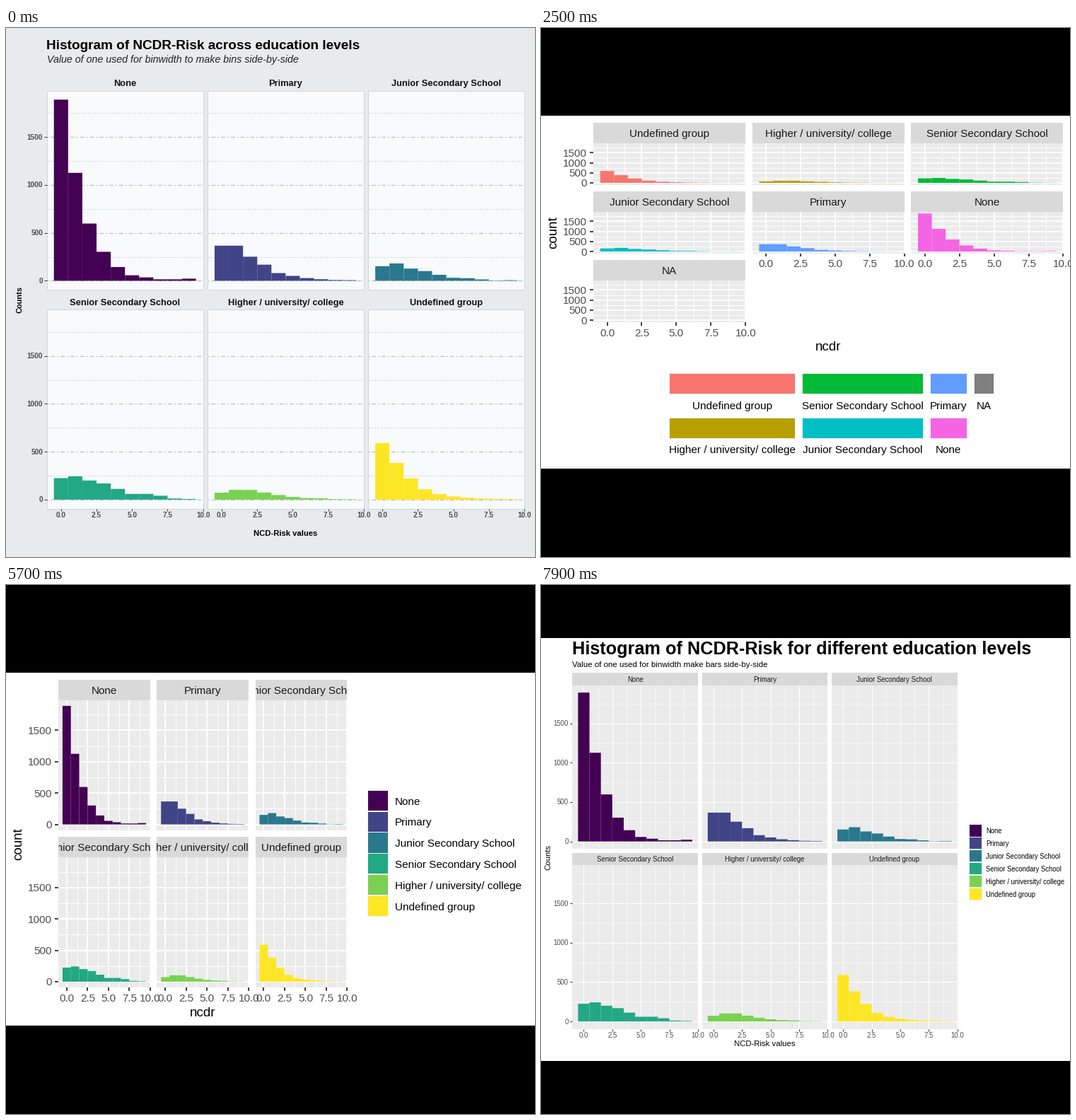
Write a matplotlib script that moves like this. It is 748x748 px and loops after 8000 ms.

```python
import matplotlib.pyplot as plt
import numpy as np
from matplotlib.animation import FuncAnimation
from matplotlib.collections import LineCollection, PolyCollection
from matplotlib.patches import Rectangle

SIZE, DPI = 748, 100
PT = 72 / DPI  # points per pixel
FONT = "Liberation Sans"

COUNTS = {
    "None": [1890, 1126, 597, 302, 143, 57, 35, 15, 15, 22],
    "Primary": [366, 366, 251, 168, 80, 51, 28, 16, 8, 6],
    "Junior Secondary School": [152, 181, 127, 101, 62, 31, 27, 14, 3, 6],
    "Senior Secondary School": [225, 243, 200, 169, 112, 60, 60, 41, 12, 7],
    "Higher / university/ college": [73, 102, 102, 74, 48, 29, 17, 13, 5, 4],
    "Undefined group": [590, 383, 221, 108, 58, 33, 20, 12, 8, 6],
    "NA": [],
}
LEVELS = list(COUNTS)[:6]
REVERSED = LEVELS[::-1] + ["NA"]
VIRIDIS = dict(zip(LEVELS, ["#440154", "#414487", "#2A788E",
                            "#22A884", "#7AD151", "#FDE725"]))
HUE = dict(zip(REVERSED, ["#F8766D", "#B79F00", "#00BA38", "#00BFC4",
                          "#619CFF", "#F564E3", "#7F7F7F"]))
TEAL = dict.fromkeys(REVERSED, "#00BFC4")
GREY = dict.fromkeys(REVERSED, "#595959")
KEY_W = dict(zip(LEVELS, [50.5, 50.5, 170, 170, 177, 177]), NA=27.5)

X_RANGE, Y_RANGE = (-1, 10), (-94.5, 1984.5)
X_TICKS, Y_TICKS = np.arange(0, 10.1, 2.5), np.arange(0, 1501, 500)
WIDE, TALL, FULL = (0, 124, 748, 623), (136, 0, 612, 748), (0, 0, 748, 748)
SCREEN = (0, 75, 748, 673)
TITLE = "Histogram of NCDR-Risk for different education levels"
SUBTITLE = "Value of one used for binwidth make bars side-by-side"


def rect(ax, x0, y0, x1, y1, color, edge="none", lw=0):
    patch = Rectangle((x0, y0), x1 - x0, y1 - y0, fc=color, ec=edge, lw=lw * PT)
    return ax.add_patch(patch)


def text(ax, x, y, s, size, color="black", ha="center", **kw):
    """Place text with its capitals centred on y."""
    return ax.text(x, y + 0.36 * size, s, size=size * PT, color=color, ha=ha,
                   va="baseline", family=FONT, **kw)


def side_text(ax, x, y, s, size, **kw):
    ax.text(x, y, s, size=size * PT, rotation=90, ha="center", va="center",
            family=FONT, **kw)


def lines(ax, segs, color, width, style="solid"):
    ax.add_collection(LineCollection(segs, colors=color, linewidths=width * PT,
                                     linestyles=style, zorder=1), autolim=False)


def scales(x0, y0, x1, y1):
    def sx(v):
        return x0 + (v - X_RANGE[0]) / (X_RANGE[1] - X_RANGE[0]) * (x1 - x0)

    def sy(v):
        return y1 - (v - Y_RANGE[0]) / (Y_RANGE[1] - Y_RANGE[0]) * (y1 - y0)
    return sx, sy


def bars(ax, counts, sx, sy, color):
    quads = [[(sx(i - .5), sy(0)), (sx(i - .5), sy(c)),
              (sx(i + .5), sy(c)), (sx(i + .5), sy(0))]
             for i, c in enumerate(counts)]
    if quads:
        ax.add_collection(PolyCollection(quads, facecolors=color, edgecolors="none",
                                         snap=False, zorder=1), autolim=False)


def facets(ax, names, fill, right, bottom, left=74, top=134, base=18.8,
           small=15.2, xlab="ncdr", ylab="count"):
    ncol, nrow = 3, -(-len(names) // 3)
    gap, strip, lw = base / 2, 1.516 * base, 0.097 * base
    w = (right - left - gap * (ncol - 1)) / ncol
    h = (bottom - top - gap * (nrow - 1)) / nrow - strip
    for i, name in enumerate(names):
        row, col = divmod(i, ncol)
        x0, ys = left + col * (w + gap), top + row * (h + strip + gap)
        x1, y0, y1 = x0 + w, ys + strip, ys + strip + h
        sx, sy = scales(x0, y0, x1, y1)
        rect(ax, x0, y0, x1, y1, "#EBEBEB")
        for off, width in ((1, lw / 2), (0, lw)):
            xs = X_TICKS[:4] + 1.25 * off if off else X_TICKS
            lines(ax, [[(sx(v), y0), (sx(v), y1)] for v in xs], "white", width)
            lines(ax, [[(x0, sy(v)), (x1, sy(v))] for v in Y_TICKS + 250 * off],
                  "white", width)
        bars(ax, COUNTS[name], sx, sy, fill[name])
        head = rect(ax, x0, ys, x1, y0, "#D9D9D9")
        text(ax, (x0 + x1) / 2, (ys + y0) / 2 + .4, name, small,
             "#1A1A1A", clip_on=True).set_clip_path(head)
        if col == 0:
            lines(ax, [[(x0 - base / 4, sy(v)), (x0, sy(v))] for v in Y_TICKS],
                  "#333333", lw)
            for v in Y_TICKS:
                text(ax, x0 - base / 2, sy(v), f"{v:.0f}", small, "#4D4D4D", "right")
        if i + ncol >= len(names):
            lines(ax, [[(sx(v), y1), (sx(v), y1 + base / 4)] for v in X_TICKS],
                  "#333333", lw)
            for v in X_TICKS:
                text(ax, sx(v), y1 + .76 * base, f"{v:.1f}", small, "#4D4D4D")
    text(ax, (left + right) / 2, bottom + 1.78 * base, xlab, base)
    side_text(ax, left - 3 * base, (top + strip + bottom) / 2, ylab, base)


def key(ax, x, y, w, h, color):
    rect(ax, x - 1, y - 1, x + w + 1, y + h + 1, "#F2F2F2")
    rect(ax, x, y, x + w, y + h, color)


def side_legend(ax, x, y, fill, names, base=18.8, small=15.2):
    pitch = 1.585 * base
    for i, name in enumerate(names):
        key(ax, x, y + i * pitch, pitch - 1.6, pitch - 1.6, fill[name])
        text(ax, x + 2.02 * base, y + (i + .48) * pitch, name, small, ha="left")


def stacked_legend(ax, title=True):
    if title:
        text(ax, 439, 147.5, "Highest Level of school completed", 18.9, ha="left")
    for i, name in enumerate(REVERSED):
        y = 166 + 62.6 * i
        key(ax, 440, y, 176.5, 28, HUE[name])
        text(ax, 528, y + 44, name, 15.2)


def bottom_legend(ax, fill, nrow=2, title=False):
    cols = [REVERSED[i:i + nrow] for i in range(0, 7, nrow)]
    widths = [KEY_W[c[0]] for c in cols]
    x = 411 - (sum(widths) + 11.3 * (len(cols) - 1)) / 2
    if title:
        x += 150
        text(ax, x - 11, 566, "Highest Level of school completed", 18.9, ha="right")
    for names, w in zip(cols, widths):
        for row, name in enumerate(names):
            y = 552 - 62.6 * (nrow - 1 - row)
            key(ax, x, y, w, 28, fill[name])
            text(ax, x + w / 2, y + 44, name, 15.2)
        x += w + 11.3


def true_false(ax):
    for x, w, color, name in ((363, 45, "#F8766D", "FALSE"),
                              (420, 39, "#00BFC4", "TRUE")):
        key(ax, x, 552, w, 28, color)
        text(ax, x + w / 2, 596, name, 15.2)


def styled(ax):
    rect(ax, *FULL, "#E8EBED")
    text(ax, 57, 23, "Histogram of NCDR-Risk across education levels", 19,
         ha="left", weight="bold")
    text(ax, 58, 43.5, "Value of one used for binwidth to make bins side-by-side",
         14.3, "#222222", "left", style="italic")
    for i, name in enumerate(LEVELS):
        row, col = divmod(i, 3)
        x0, y0 = 57.7 + 227.2 * col, 88.5 + 309.5 * row
        x1, y1 = x0 + 221, y0 + 281.7
        sx, sy = scales(x0, y0, x1, y1)
        rect(ax, x0, y0, x1, y1, "#F8FAFC", "#D3D6D8", 1)
        lines(ax, [[(x0, sy(v)), (x1, sy(v))] for v in Y_TICKS + 250],
              "#CBCDCF", 1, (0, (2.2, 2.2)))
        lines(ax, [[(x0, sy(v)), (x1, sy(v))] for v in Y_TICKS],
              "#BCBEC0", 1.2, (0, (1.5, 2.5, 5, 2.5)))
        bars(ax, COUNTS[name], sx, sy, VIRIDIS[name])
        text(ax, (x0 + x1) / 2, y0 - 11, name, 12.9, "#111111", weight="bold")
        if col == 0:
            lines(ax, [[(x0 - 3.5, sy(v)), (x0, sy(v))] for v in Y_TICKS], "#333333", 1)
            for v in Y_TICKS:
                text(ax, x0 - 5.5, sy(v), f"{v:.0f}", 10, "#4D4D4D", "right",
                     weight="bold")
        if row:
            lines(ax, [[(sx(v), y1), (sx(v), y1 + 3.5)] for v in X_TICKS], "#333333", 1)
            for v in X_TICKS:
                text(ax, sx(v), y1 + 8.8, f"{v:.1f}", 10, "#4D4D4D", weight="bold")
    text(ax, 395, 714, "NCD-Risk values", 11.2, weight="bold")
    side_text(ax, 19.5, 383.5, "Counts", 11, weight="bold")


def page(box, *parts):
    def draw(ax):
        rect(ax, *box, "white")
        for fn, args, kw in parts:
            fn(ax, *args, **kw)
    return draw


def part(fn, *args, **kw):
    return fn, args, kw


def wide(names, fill, right, bottom, *legend):
    return page(WIDE, part(facets, names, fill, right, bottom), *legend)


def tall(right, *legend):
    return page(TALL, part(facets, LEVELS, VIRIDIS, right, 708.3, left=191, top=7,
                           base=14.3, small=11.95), *legend)


def screen(top, bottom, *heads, xlab="NCD-Risk values", ylab="Counts"):
    return page(SCREEN, part(facets, LEVELS, VIRIDIS, 588.7, bottom, left=44.3, top=top,
                             base=11.4, small=9.6, xlab=xlab, ylab=ylab),
                part(side_legend, 606.3, 339.2, VIRIDIS, LEVELS, 11.3, 9.55), *heads)


def heading(y, s, size, **kw):
    return part(text, 44, y, s, size, ha="left", **kw)


SIDE_HUE = part(side_legend, 512, 276, HUE, REVERSED)
SIDE_VIR = part(side_legend, 512, 290.8, VIRIDIS, LEVELS)
LABEL = part(text, 439, 254, "Highest Level of school completed", 18.9, ha="left")
SIDE_HUE_LEFT = part(side_legend, 440, 276, HUE, REVERSED)
TF = part(true_false)
BOLD = heading(89, TITLE, 25.2, weight="bold")

SLIDES = [
    (0, styled),
    (500, wide(REVERSED, GREY, 738.5, 569.3)),
    (700, wide(REVERSED, HUE, 482.5, 569.3, SIDE_HUE)),
    (900, wide(REVERSED, HUE, 410.6, 569.3, LABEL, SIDE_HUE_LEFT)),
    (1100, wide(REVERSED, HUE, 410.6, 569.3, part(stacked_legend, False))),
    (1300, wide(REVERSED, HUE, 410.6, 569.3, part(stacked_legend))),
    (1500, wide(REVERSED, HUE, 410.6, 569.3, LABEL, SIDE_HUE_LEFT)),
    (1700, wide(REVERSED, HUE, 738.5, 478.2, part(bottom_legend, HUE, 1, True))),
    (1900, wide(REVERSED, HUE, 738.5, 478.2, part(bottom_legend, HUE, 1))),
    (2100, wide(REVERSED, HUE, 738.5, 415.8, part(bottom_legend, HUE, 2, True))),
    (2300, wide(LEVELS[::-1], HUE, 738.5, 415.8, part(bottom_legend, HUE))),
    (2500, wide(REVERSED, HUE, 738.5, 415.8, part(bottom_legend, HUE))),
    (3700, wide(LEVELS[::-1], TEAL, 738.5, 478.2, TF)),
    (3900, wide(REVERSED, TEAL, 738.5, 478.2, TF)),
    (4100, wide(REVERSED, HUE, 738.5, 415.8, part(bottom_legend, HUE))),
    (4700, wide(REVERSED, TEAL, 738.5, 478.2, TF)),
    (4900, wide(LEVELS[::-1], TEAL, 738.5, 478.2, TF)),
    (5100, wide(LEVELS[::-1], HUE, 738.5, 415.8, part(bottom_legend, HUE))),
    (5300, wide(LEVELS[::-1], HUE, 482.5, 569.3, SIDE_HUE)),
    (5500, wide(LEVELS[::-1], VIRIDIS, 482.5, 569.3, SIDE_VIR)),
    (5700, wide(LEVELS, VIRIDIS, 482.5, 569.3, SIDE_VIR)),
    (5900, wide(LEVELS, VIRIDIS, 738.5, 569.3)),
    (6100, tall(604)),
    (6300, tall(412.5, part(side_legend, 434.7, 311.7, VIRIDIS, LEVELS, 14.15, 11.95))),
    (6500, page(FULL, part(facets, LEVELS, VIRIDIS, 549, 708.3, left=43, top=7,
                           base=14.3, small=11.95),
                part(side_legend, 571, 311.7, VIRIDIS, LEVELS, 14.15, 11.95))),
    (6700, page(SCREEN, part(facets, LEVELS, VIRIDIS, 742, 646, left=44.3, top=80.5,
                             base=11.4, small=9.6))),
    (6900, screen(80.5, 646, xlab="ncdr", ylab="count")),
    (7100, screen(80.5, 646)),
    (7300, screen(102, 646, heading(88, TITLE, 13.7))),
    (7500, screen(108, 646, BOLD)),
    (7700, screen(124.3, 646, BOLD, heading(112, SUBTITLE, 11.5))),
    (7900, screen(124.3, 627.7, BOLD, heading(112, SUBTITLE, 11.5))),
]

fig = plt.figure(figsize=(SIZE / DPI, SIZE / DPI), dpi=DPI, facecolor="black")
views = []
for _, draw in SLIDES:
    ax = fig.add_axes([0, 0, 1, 1], label=f"view{len(views)}")
    ax.set(xlim=(0, SIZE), ylim=(SIZE, 0))
    ax.axis("off")
    ax.set_visible(False)
    draw(ax)
    views.append(ax)

STEP, LOOP = 100, 8000
starts = np.array([t for t, _ in SLIDES])


def update(i):
    current = np.searchsorted(starts, i * STEP, side="right") - 1
    for k, ax in enumerate(views):
        ax.set_visible(k == current)
    return views


anim = FuncAnimation(fig, update, frames=LOOP // STEP, interval=STEP,
                     repeat=True, repeat_delay=0, blit=False)
plt.show()
```
